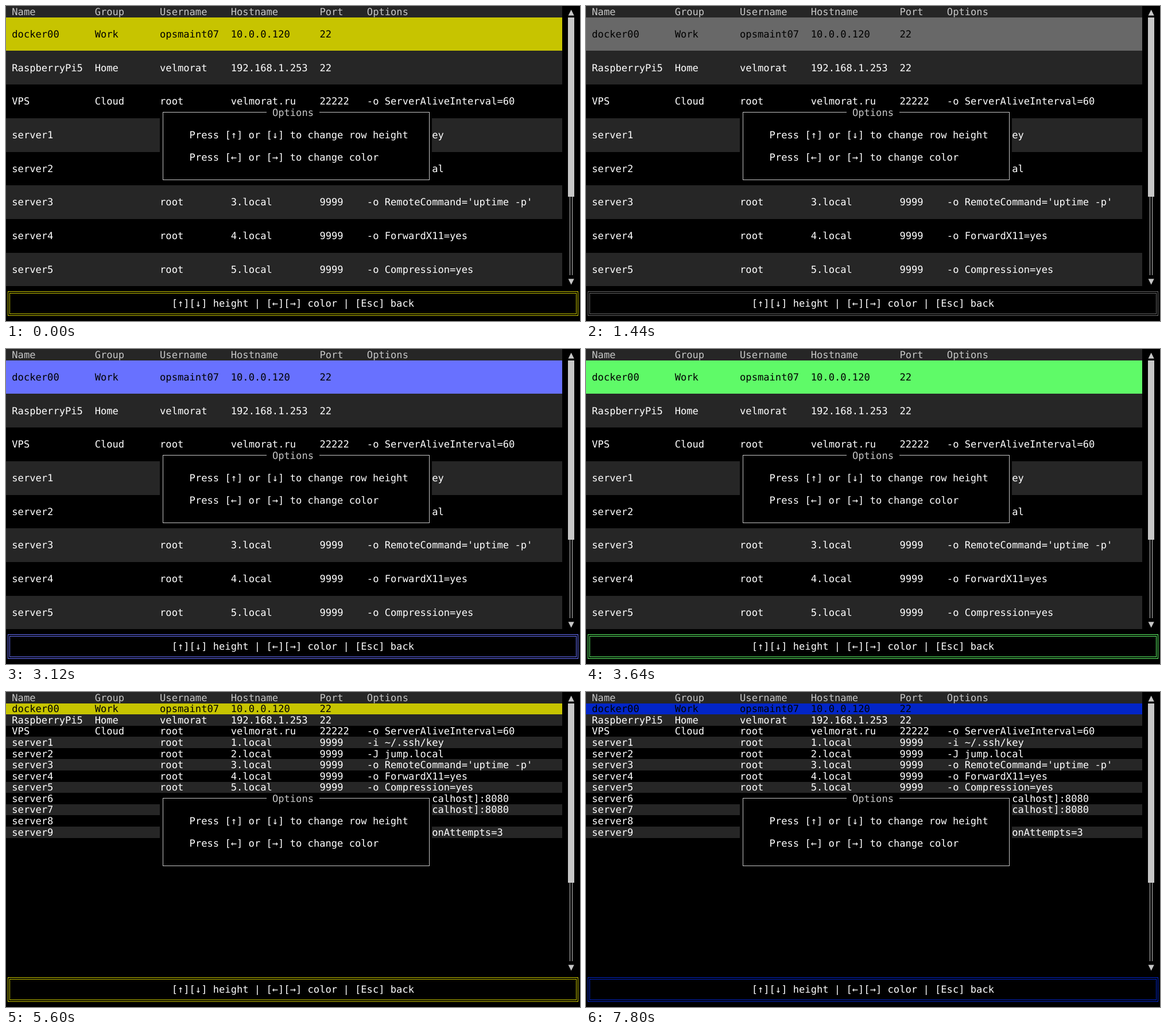
Recreate the animation shown at these times as an HTML page. Size 1000 px wide and 550 px high, loop 8 s.

```html
<!DOCTYPE html>
<html lang="en">
<head>
<meta charset="utf-8">
<title>SSH host list</title>
<style>
  html, body { margin: 0; width: 100%; height: 100%; overflow: hidden; background: #000; }
  svg {
    display: block; width: 1000px; height: 550px;
    animation: theme 8s step-end infinite;
  }
  text {
    font: 17.123px "DejaVu Sans Mono", monospace;
    text-rendering: geometricPrecision;
    fill: #fff;
  }
  text.dim { fill: #c7c7c7; }
  text.dark { fill: #000; }
  rect, path { shape-rendering: crispEdges; }
  .line { fill: none; stroke: #c7c7c7; }
  .frame { fill: none; stroke: currentColor; }
  #tall { animation: tall 8s step-end infinite; }
  #short { animation: short 8s step-end infinite; }

  @keyframes theme {
    0%    { color: #c7c400; }
    11.5% { color: #60fdff; }
    14.5% { color: #ffffff; }
    18%   { color: #686868; }
    21%   { color: #c7c7c7; }
    24%   { color: #ca30c7; }
    27%   { color: #0225c7; }
    30%   { color: #00c200; }
    33%   { color: #c91b00; }
    36%   { color: #ff77ff; }
    39%   { color: #6871ff; }
    42.5% { color: #fffc67; }
    45.5% { color: #5ffa68; }
    48.5% { color: #ff6e67; }
    51.5% { color: #00c5c7; }
    54.5% { color: #c7c400; }
    82%   { color: #60fdff; }
    85%   { color: #ffffff; }
    88%   { color: #686868; }
    91%   { color: #c7c7c7; }
    94%   { color: #ca30c7; }
    97.5%, 100% { color: #0225c7; }
  }
  @keyframes tall { 0% { visibility: visible; } 70%, 100% { visibility: hidden; } }
  @keyframes short { 0% { visibility: hidden; } 70%, 100% { visibility: visible; } }
</style>
</head>
<body>
<svg id="screen" viewBox="0 0 1000 550"></svg>
<script>
  const CELL_W = 1000 / 97, CELL_H = 19.58, BASE = 15.6;
  const COLS = [1, 15, 26, 38, 53, 61];
  const HEAD = ["Name", "Group", "Username", "Hostname", "Port", "Options"];

  const server = (n, options) => ["server" + n, "", "root", n + ".local", "9999", options];
  const HOSTS = [
    ["docker00", "Work", "opsmaint07", "10.0.0.120", "22", ""],
    ["RaspberryPi5", "Home", "velmorat", "192.168.1.253", "22", ""],
    ["VPS", "Cloud", "root", "velmorat.ru", "22222", "-o ServerAliveInterval=60"],
    ...[
      "-i ~/.ssh/key",
      "-J jump.local",
      "-o RemoteCommand='uptime -p'",
      "-o ForwardX11=yes",
      "-o Compression=yes",
      "-L 8080:[localhost]:8080",
      "-R 8080:[localhost]:8080",
      "",
      "-o ConnectionAttempts=3"
    ].map((options, i) => server(i + 1, options))
  ];

  const escape = s => s.replace(/&/g, "&amp;").replace(/</g, "&lt;");
  const text = (col, row, s, cls = "") =>
    s && `<text class="${cls}" x="${(col * CELL_W).toFixed(2)}" y="${(row * CELL_H + BASE).toFixed(2)}">${escape(s)}</text>`;

  // Fills a block of character cells, snapped to whole pixels
  function block(col, row, cols, rows, fill) {
    const x = Math.round(col * CELL_W), y = Math.round(row * CELL_H);
    const w = Math.round((col + cols) * CELL_W) - x;
    const h = Math.round((row + rows) * CELL_H) - y;
    return `<rect x="${x}" y="${y}" width="${w}" height="${h}" fill="${fill}"/>`;
  }

  const cells = (row, values, cls) => values.map((s, i) => text(COLS[i], row, s, cls)).join("");
  const path = (cls, d) => `<path class="${cls}" d="${d}"/>`;

  function table(id, height) {
    const count = Math.min(HOSTS.length, Math.floor(24 / height));
    const rows = HOSTS.slice(0, count).map((host, i) => {
      const top = 1 + i * height;
      const fill = i === 0 ? "currentColor" : i % 2 ? "#262626" : "#000";
      return block(0, top, 94, height, fill) +
        cells(top + (height - 1) / 2, host, i === 0 ? "dark" : "");
    });
    return `<g id="${id}">${rows.join("")}</g>`;
  }

  const header = block(0, 0, 94, 1, "#262626") + cells(0, HEAD, "dim");

  const scrollbar = text(95, 0, "▲", "dim") + text(95, 24, "▼", "dim") +
    block(95, 1, 1, 16, "#c7c7c7") +
    path("line", "M982.5 333V470M986.5 333V470");

  const popup = block(26, 9, 46, 7, "#000") +
    path("line", "M454 185.5H273.5V303.5H737.5V185.5H546") +
    text(45, 9, "Options", "dim") +
    text(31, 11, "Press [↑] or [↓] to change row height") +
    text(31, 13, "Press [←] or [→] to change color");

  const footer = path("frame", "M3.5 498.5H996.5V540.5H3.5ZM6.5 501.5H993.5V537.5H6.5Z") +
    text(28, 26, "[↑][↓] height | [←][→] color | [Esc] back");

  document.getElementById("screen").innerHTML =
    header + table("tall", 3) + table("short", 1) + scrollbar + popup + footer;
</script>
</body>
</html>
```
